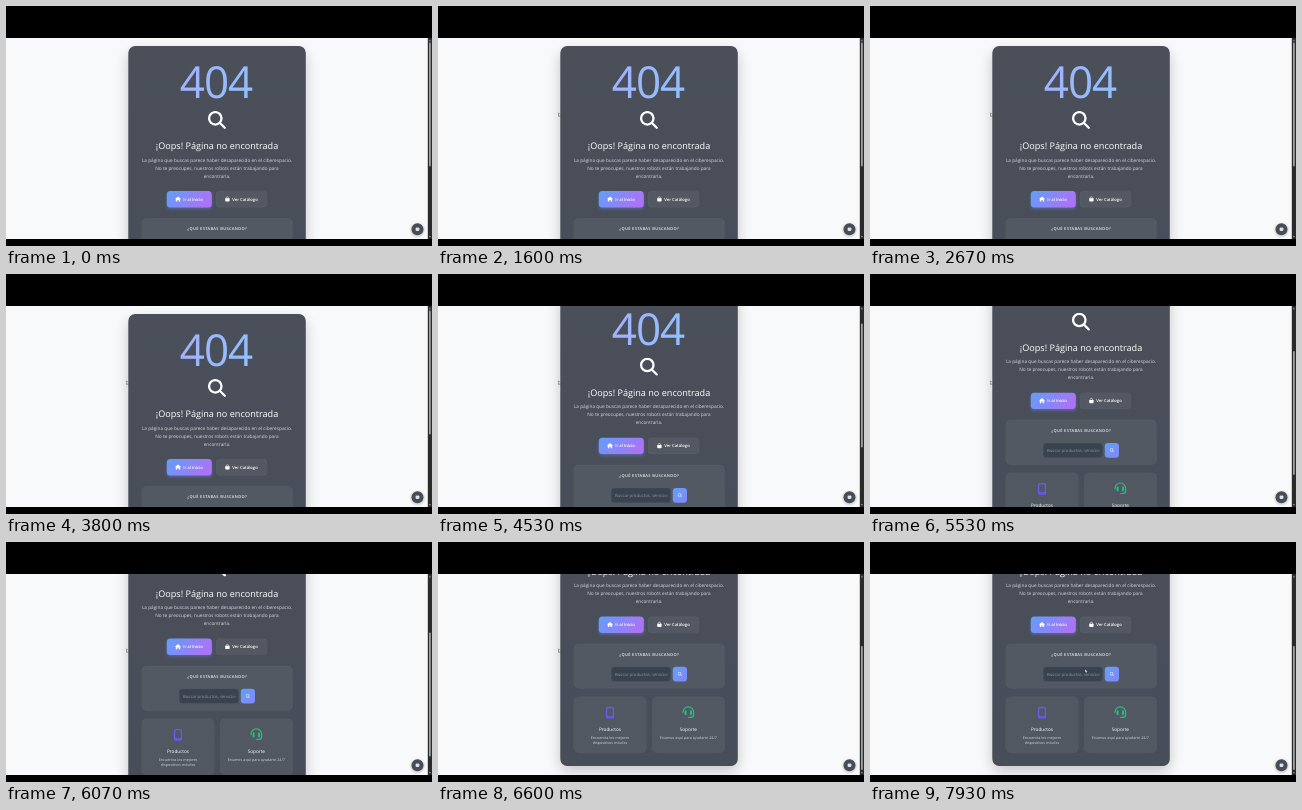
Recreate the animation shown at these times as an HTML page. Size 426 px wide and 240 px high, loop 8000 ms.

```html
<!DOCTYPE html>
<html lang="es">
<head>
<meta charset="utf-8">
<title>Página no encontrada</title>
<style>
  html, body { margin: 0; width: 100%; height: 100%; overflow: hidden; background: #000; }
  svg { display: block; width: 100vw; height: 100vh; }
  text {
    font-family: "Open Sans", "Noto Sans", sans-serif;
    text-anchor: middle;
    text-rendering: geometricPrecision;
    fill: #fff;
  }
  .code { font-size: 44px; letter-spacing: -1px; fill: url(#codeFill); }
  .title { font-size: 9.1px; }
  .lead { font-size: 4.74px; fill: #d6d9de; }
  .button { font-size: 4.15px; font-weight: 600; }
  .heading { font-size: 4px; font-weight: 600; letter-spacing: .32px; fill: #e8eaed; }
  .hint { font-size: 4.25px; text-anchor: start; fill: #8d95a2; }
  .name { font-size: 4.7px; font-weight: 500; }
  .note { font-size: 3.72px; fill: #ced2d8; }
  .panel { fill: #fff; fill-opacity: .055; stroke: #fff; stroke-opacity: .09; stroke-width: .4; }
</style>
</head>
<body>
<svg viewBox="0 0 426 240">
  <defs>
    <linearGradient id="codeFill" gradientUnits="userSpaceOnUse" x1="175" y1="60" x2="246" y2="92">
      <stop stop-color="#a5b0fd"/><stop offset="1" stop-color="#8fc2fb"/>
    </linearGradient>
    <linearGradient id="accent" x2="1" y2=".3">
      <stop stop-color="#609ffa"/><stop offset="1" stop-color="#a974f6"/>
    </linearGradient>
    <linearGradient id="searchFill" x2="1" y2="1">
      <stop stop-color="#60a0fa"/><stop offset="1" stop-color="#8487f8"/>
    </linearGradient>
    <linearGradient id="cardFill" x2="0" y2="1">
      <stop stop-color="#4a4f59"/><stop offset="1" stop-color="#484e59"/>
    </linearGradient>
    <filter id="blur" x="-30%" y="-30%" width="160%" height="160%"><feGaussianBlur stdDeviation="7"/></filter>
    <filter id="glow" x="-30%" y="-60%" width="160%" height="220%"><feGaussianBlur stdDeviation="1.8"/></filter>
    <clipPath id="view"><rect y="32" width="426" height="201"/></clipPath>
    <clipPath id="field"><rect x="173" y="235" width="56.5" height="15"/></clipPath>
    <symbol id="lens" viewBox="0 0 18 18">
      <g fill="none" stroke="#fff" stroke-width="2.25">
        <circle cx="7.3" cy="7.3" r="6.2"/>
        <path d="M11.7 11.7 16.8 16.8" stroke-linecap="round"/>
      </g>
    </symbol>
  </defs>

  <rect width="426" height="240"/>
  <g clip-path="url(#view)">
    <rect y="32" width="426" height="201" fill="#f7f9fb"/>

    <g id="page">
      <rect x="122" y="46" width="178" height="294" rx="8" opacity=".2" filter="url(#blur)"/>
      <rect x="122.3" y="40" width="177.5" height="294.5" rx="7" fill="url(#cardFill)"/>

      <text class="code" x="210" y="92">404</text>
      <use href="#lens" x="202" y="105" width="18" height="18"/>
      <text class="title" x="211" y="143.3">¡Oops! Página no encontrada</text>
      <g class="lead-lines">
        <text class="lead" x="211" y="155.6">La página que buscas parece haber desaparecido en el ciberespacio.</text>
        <text class="lead" x="211" y="163.6">No te preocupes, nuestros robots están trabajando para</text>
        <text class="lead" x="211" y="171.6">encontrarla.</text>
      </g>

      <rect x="161" y="187" width="45" height="16" rx="3.5" fill="#6d8df8" opacity=".4" filter="url(#glow)"/>
      <rect x="160.8" y="185" width="45" height="16.4" rx="3.5" fill="url(#accent)"/>
      <path d="M172 190.4 175 193.1H174.2V195.6H172.7V193.9H171.3V195.6H169.8V193.1H169Z" fill="#fff"/>
      <text class="button" x="187" y="194.6">Ir al Inicio</text>

      <rect class="panel" x="210" y="185.2" width="51" height="16" rx="3.5"/>
      <path d="M219.2 192.2H223.6V194.6Q223.6 195.5 222.7 195.5H220.1Q219.2 195.5 219.2 194.6Z" fill="#fff"/>
      <path d="M220.3 192.6V191.8A1.1 1.1 0 0 1 222.5 191.8V192.6" fill="none" stroke="#fff" stroke-width=".55"/>
      <text class="button" x="239" y="194.6">Ver Catálogo</text>

      <rect class="panel" x="135.7" y="212.4" width="151" height="44.4" rx="5"/>
      <text class="heading" x="211.2" y="224.4">¿QUÉ ESTABAS BUSCANDO?</text>
      <rect x="173.2" y="235.2" width="59.5" height="14.8" rx="3.3" fill="#3a424f" stroke="#59616d" stroke-width=".3"/>
      <text class="hint" x="177" y="244.3" clip-path="url(#field)">Buscar productos, servicios...</text>
      <rect x="234.8" y="235.2" width="14.2" height="14.8" rx="3.3" fill="url(#searchFill)"/>
      <use href="#lens" x="239.7" y="240.4" width="4.4" height="4.4"/>

      <rect class="panel" x="135.7" y="265.2" width="72.5" height="56" rx="5"/>
      <rect x="168.6" y="276" width="6.8" height="10.4" rx="1" fill="none" stroke="#6759f0" stroke-width="1.4"/>
      <path d="M168.6 284.3H175.4V286.2H168.6Z" fill="#6759f0"/>
      <circle cx="172" cy="285.2" r=".6" fill="#545a64"/>
      <text class="name" x="172" y="299">Productos</text>
      <text class="note" x="172" y="307.2">Encuentra los mejores</text>
      <text class="note" x="172" y="312.8">dispositivos móviles</text>

      <rect class="panel" x="214.2" y="265.2" width="72.5" height="56" rx="5"/>
      <g fill="none" stroke="#21c083" stroke-width="1.2" stroke-linecap="round">
        <path d="M245 281V280.6A5.3 5.3 0 0 1 255.6 280.6V283.4Q255.6 285.8 253.2 285.8H250.8"/>
        <path d="M247.6 279.8V282.8M253 279.8V282.8" stroke-width="2"/>
      </g>
      <text class="name" x="250.3" y="299">Soporte</text>
      <text class="note" x="250.3" y="307.2">Estamos aquí para ayudarte 24/7</text>
    </g>

    <circle cx="411.5" cy="224" r="6.3" opacity=".25" filter="url(#glow)"/>
    <circle cx="411.5" cy="223.2" r="6" fill="#474d57"/>
    <rect x="409.6" y="221.4" width="3.8" height="3.6" rx="1.2" fill="#dfe2e7"/>

    <rect x="421.8" y="32" width="4.2" height="201" fill="#2b2b2b"/>
    <path d="M422.9 35.2 423.9 33.8 424.9 35.2ZM422.9 230 423.9 231.4 424.9 230Z" fill="#9f9f9f"/>
    <rect id="thumb" x="423" y="36.5" width="1.8" height="124" rx=".9" fill="#9f9f9f"/>

    <path id="cursor" d="M0 0V3.7L.9 2.9 1.5 4.2 2.1 3.9 1.6 2.7H2.7Z" fill="#fff" stroke="#222" stroke-width=".4"/>
  </g>
</svg>
<script>
  const LOOP = 8000;
  const NOTCH = 22.1;
  const NOTCH_TIME = 250;
  const notchStarts = [4310, 4720, 5260, 5740, 6330];
  const THUMB_RATIO = 0.61;

  // Pointer waypoints: time, x, y
  const pointerPath = [
    [150, 56, 27], [500, 58, 40], [870, 67, 54], [1250, 104, 92], [1550, 120.5, 106.8],
    [7150, 120.5, 106.8], [7750, 215, 127]
  ];

  const page = document.getElementById('page');
  const thumb = document.getElementById('thumb');
  const cursor = document.getElementById('cursor');

  const clamp = v => Math.min(1, Math.max(0, v));
  const easeInOut = v => v * v * (3 - 2 * v);

  function scrollAt(t) {
    return notchStarts.reduce((sum, start) => sum + NOTCH * easeInOut(clamp((t - start) / NOTCH_TIME)), 0);
  }

  function pointerAt(t) {
    const next = pointerPath.findIndex(p => p[0] > t);
    if (next === 0) return pointerPath[0].slice(1);
    if (next < 0) return pointerPath.at(-1).slice(1);
    const [t0, x0, y0] = pointerPath[next - 1];
    const [t1, x1, y1] = pointerPath[next];
    const k = (t - t0) / (t1 - t0);
    return [x0 + (x1 - x0) * k, y0 + (y1 - y0) * k];
  }

  function draw() {
    const t = performance.now() % LOOP;
    const scroll = scrollAt(t);
    page.setAttribute('transform', `translate(0 ${-scroll})`);
    thumb.setAttribute('transform', `translate(0 ${scroll * THUMB_RATIO})`);
    cursor.setAttribute('transform', `translate(${pointerAt(t)})`);
    requestAnimationFrame(draw);
  }
  draw();
</script>
</body>
</html>
```
